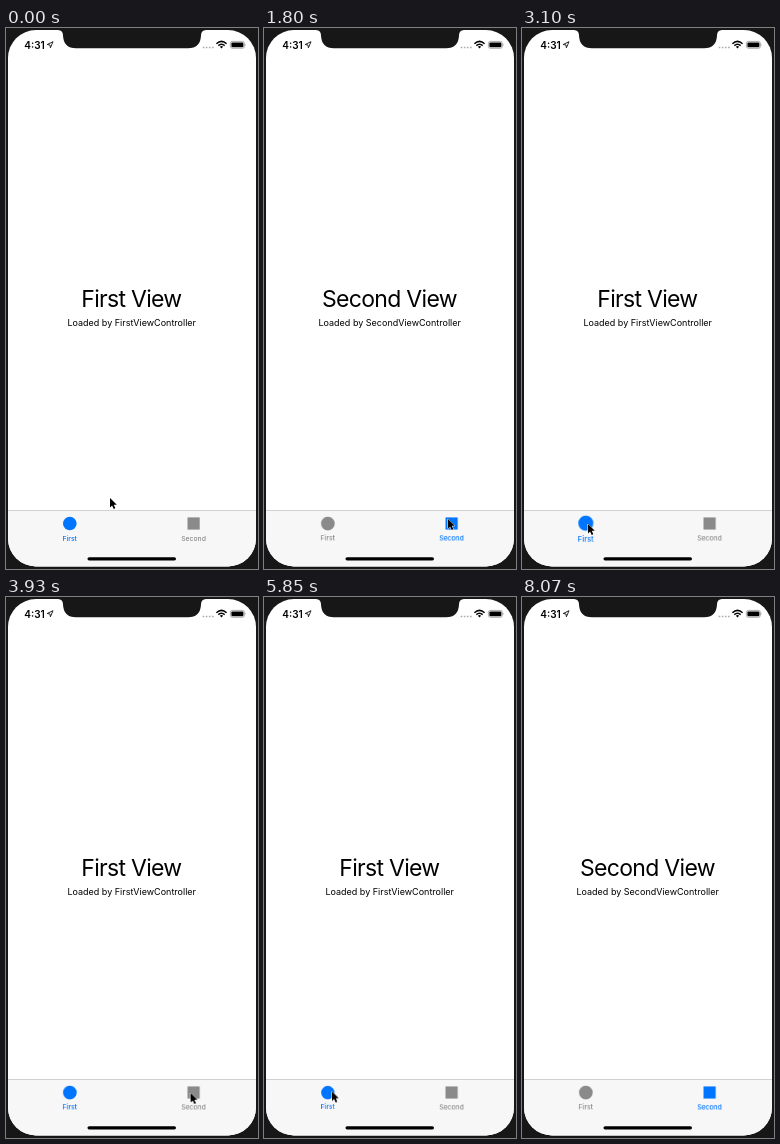
Animation of 252 by 541 pixels, one loop 8160 ms. Source, as an HTML page:

```html
<!DOCTYPE html>
<html lang="en">
<head>
<meta charset="utf-8">
<title>Tab bar bounce</title>
<style>
  html, body { margin: 0; width: 100%; height: 100%; overflow: hidden; background: #171717; }
  svg { display: block; width: 100vw; height: 100vh; }
  text { font-family: Inter, "Open Sans", sans-serif; text-anchor: middle; }
  .title { font-size: 23px; letter-spacing: -.7px; }
  .note { font-size: 9px; }
  .tab { color: #8a8a8a; fill: currentColor; }
  .tab text { font-size: 6.8px; font-weight: 500; }
  #tab1 { color: #0075ff; transform-origin: 63.7px 499px; }
  #tab2 { transform-origin: 187.5px 499px; }
  #view2, #ring { opacity: 0; }
</style>
</head>
<body>
<svg viewBox="0 0 252 541">
  <defs>
    <clipPath id="screen"><rect x="2" y="2" width="248" height="536.5" rx="28"/></clipPath>
  </defs>
  <g clip-path="url(#screen)">
    <rect width="252" height="541" fill="#fff"/>
    <rect y="483" width="252" height="58" fill="#f7f7f7"/>
    <rect y="482.3" width="252" height=".7" fill="#bdbdbd"/>
  </g>
  <path d="M52 0V2Q57 2.3 57 7.5Q57.5 20.3 70 20.3H182Q194.5 20.3 195 7.5Q195 2.3 200 2V0Z" fill="#171717"/>

  <!-- status bar -->
  <text x="28.6" y="20.6" font-size="10" font-weight="600">4:31</text>
  <path d="M47 13.7L41.2 16.5L44 17L44.4 19.8Z" fill="none" stroke="#111" stroke-width=".9" stroke-linejoin="round"/>
  <path d="M196.7 19.5H208" stroke="#aaa" stroke-width="1.4" stroke-dasharray="1.6 1.5"/>
  <g fill="none" stroke="#000" stroke-width="1.5">
    <path d="M210.4 15.7Q215.5 11.1 220.6 15.7"/>
    <path d="M212.3 17.6Q215.5 14.9 218.7 17.6"/>
  </g>
  <path d="M213.9 18.7Q215.5 17.5 217.1 18.7L215.5 20.4Z"/>
  <rect x="224.4" y="13.4" width="14" height="6.9" rx="2" fill="none" stroke="#888" stroke-width=".7"/>
  <rect x="225.4" y="14.4" width="12" height="4.9" rx="1.1"/>
  <path d="M239.3 15.7Q240.5 16.8 239.3 18Z" fill="#888"/>

  <g id="view1">
    <text class="title" x="125.4" y="278.7">First View</text>
    <text class="note" x="125.7" y="298.3">Loaded by FirstViewController</text>
  </g>
  <g id="view2">
    <text class="title" x="125.4" y="278.7">Second View</text>
    <text class="note" x="125.7" y="298.3">Loaded by SecondViewController</text>
  </g>

  <g id="tab1" class="tab">
    <circle cx="63.8" cy="495.5" r="6.8"/>
    <text x="63.7" y="512.5">First</text>
  </g>
  <g id="tab2" class="tab">
    <rect x="181.5" y="489.4" width="12.2" height="12.2"/>
    <text x="187.5" y="512.5">Second</text>
  </g>
  <rect x="81.5" y="529.2" width="88.5" height="3.2" rx="1.6"/>

  <g id="cursor">
    <circle id="ring" r="14" fill="none" stroke="#111" stroke-width="1.2"/>
    <path d="M0 0V9.4L2.1 7.4L3.7 11L5.3 10.3L3.8 6.8H6.8Z" stroke="#fff" stroke-width="1" paint-order="stroke"/>
  </g>
</svg>
<script>
  const LOOP = 8160;

  // frames: [ms, value, easing towards the next value]
  function play(id, property, frames, easing = 'linear') {
    const keys = frames.map(([ms, value, ease = easing]) =>
      ({ offset: ms / LOOP, [property]: value, easing: ease }));
    keys.push({ ...keys[keys.length - 1], offset: 1 });
    document.getElementById(id).animate(keys, { duration: LOOP, iterations: Infinity });
  }

  // alternates between two values with hard changes
  function toggle(id, property, a, b, times) {
    play(id, property, [0, ...times].map((ms, i) => [ms, i % 2 ? b : a]), 'step-end');
  }

  function bounce(id, starts) {
    const frames = [[0, 'scale(1)']];
    for (const start of starts)
      [1, 1.15, .95, 1.02, 1].forEach((s, i) => frames.push([start + i * 75, `scale(${s})`]));
    play(id, 'transform', frames, 'ease-in-out');
  }

  const switches = [1800, 3000, 4270, 5670, 6970];
  const blue = '#0075ff', gray = '#8a8a8a';
  toggle('view1', 'opacity', 1, 0, switches);
  toggle('view2', 'opacity', 0, 1, switches);
  toggle('tab1', 'color', blue, gray, switches);
  toggle('tab2', 'color', gray, blue, switches);
  bounce('tab1', [3000, 5670]);
  bounce('tab2', [4270, 6970]);

  const presses = [1100, 2900, 4170, 5570, 6870];
  toggle('ring', 'opacity', 0, 1, presses.flatMap(ms => [ms, ms + 100]));
  toggle('cursor', 'opacity', 1, 0, [7430]);

  const at = (ms, x, y, ease) => [ms, `translate(${x}px, ${y}px)`, ease];
  play('cursor', 'transform', [
    at(0, 104, 470), at(100, 104, 470, 'ease-in'),
    at(380, 130, 450, 'ease-out'), at(800, 184, 491),
    at(2000, 184, 491, 'ease-in-out'), at(2500, 39, 499, 'ease-in-out'), at(2770, 66, 496),
    at(3310, 66, 496, 'ease-in-out'), at(4000, 187, 496),
    at(4740, 187, 496, 'ease-in-out'), at(5030, 74, 495),
    at(5140, 74, 495, 'ease-in-out'), at(5300, 68, 494.5),
    at(6140, 68, 494.5, 'ease-in-out'), at(6670, 187, 496),
    at(7290, 187, 496, 'ease-in'), at(7420, 235, 500)
  ]);
</script>
</body>
</html>
```
